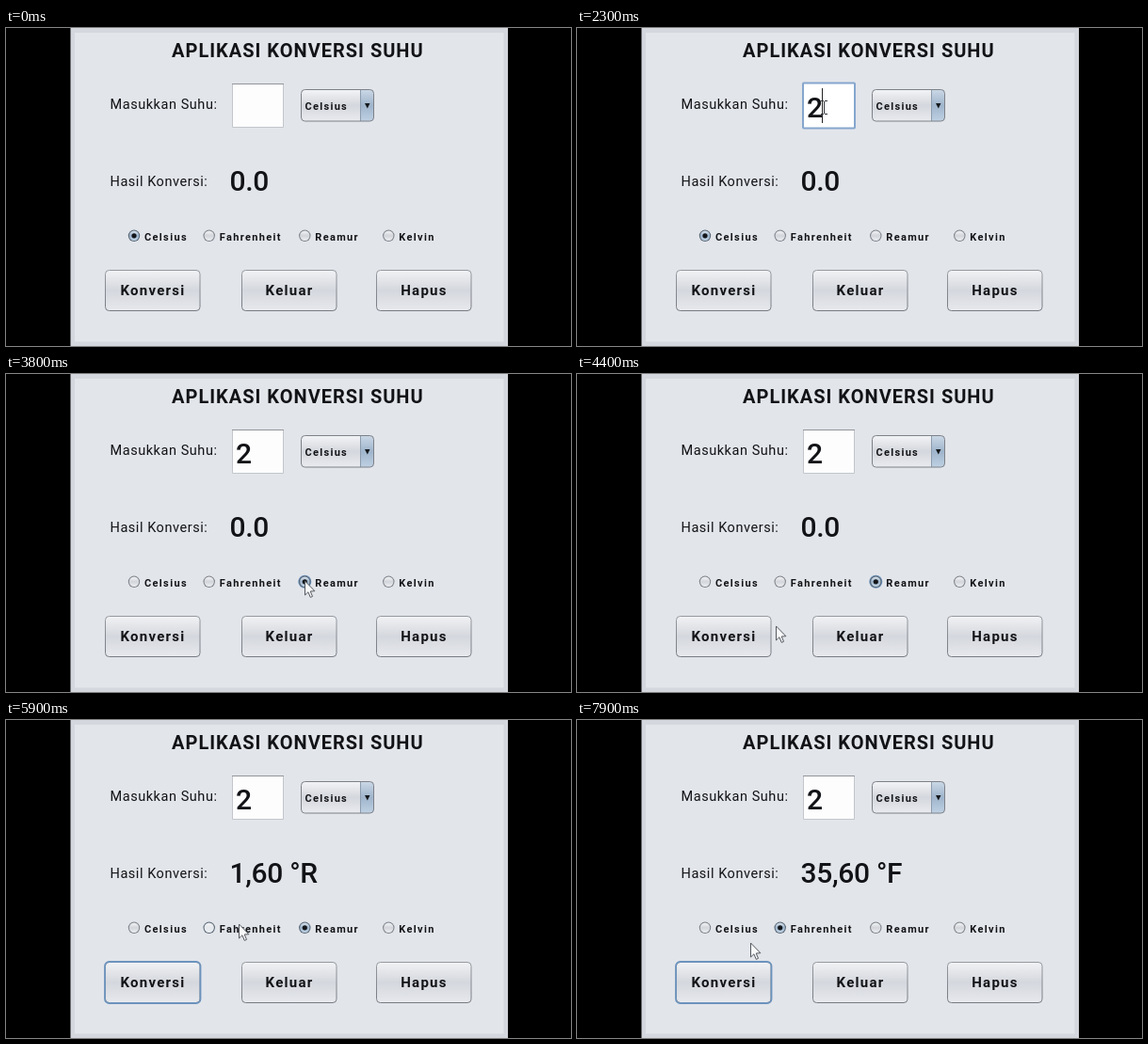
Animation of 600x338 px, one loop 8 s. Source, as an HTML page with a canvas:

```html
<!DOCTYPE html>
<html lang="id">
<head>
<meta charset="utf-8">
<title>Konversi Suhu</title>
<style>
html, body { margin: 0; width: 100%; height: 100%; overflow: hidden; background: #000; }
canvas { display: block; width: 600px; height: 338px; }
</style>
</head>
<body>
<canvas id="stage" width="600" height="338"></canvas>
<script>
const ctx = document.getElementById('stage').getContext('2d');
const LOOP = 8000, STEP = 100, MOVE = 400, BLINK = 500;
const INK = '#121316', EDGE = '#7d8188', RING = '#6c93bd';

// Clicks and key presses
const FOCUS = 900, TYPE = 2100, REAMUR = 3700, FIRST = 4700,
  FAHRENHEIT = 6500, SECOND = 7400, HOLD = 100;

const buttons = { Konversi: 105, Keluar: 250, Hapus: 393 };
const radios = { Celsius: 136, Fahrenheit: 215.7, Reamur: 317.3, Kelvin: 406.3 };

// Pointer stops: arrival time, x, y
const stops = [
  [700, 290, 2], [1000, 262, 84], [2900, 175, 291], [3100, 251, 197],
  [3400, 317, 220], [4200, 220, 284], [4400, 211, 268], [4600, 190, 279],
  [5900, 247, 217], [6100, 222, 219], [7100, 200, 279], [7900, 184, 237]
];

const inBox = ([px, py], x, y, w, h) => px >= x && px < x + w && py >= y && py < y + h;

// Rest at each stop, then glide to the next one within MOVE
function pointerAt(t) {
  const i = stops.findIndex(s => s[0] >= t);
  if (i < 0) return stops.at(-1).slice(1);
  const [arrive, x, y] = stops[i];
  if (i === 0) return t < arrive ? null : [x, y];
  const [left, fromX, fromY] = stops[i - 1];
  const begin = Math.max(left, arrive - MOVE);
  const k = Math.max(0, (t - begin) / (arrive - begin));
  const ease = k * k * (3 - 2 * k);
  return [fromX + (x - fromX) * ease, fromY + (y - fromY) * ease];
}

function label(text, x, y, size, weight = 400, spacing = 0, align = 'left') {
  ctx.font = `${weight} ${size}px Roboto, "Open Sans", sans-serif`;
  ctx.letterSpacing = spacing + 'px';
  ctx.textAlign = align;
  ctx.fillStyle = INK;
  ctx.fillText(text, x, y);
}

function rect(x, y, w, h, fill) {
  ctx.fillStyle = fill;
  ctx.fillRect(x, y, w, h);
}

function shade(y, h, ...colors) {
  const g = ctx.createLinearGradient(0, y, 0, y + h);
  colors.forEach((c, i) => g.addColorStop(i / (colors.length - 1), c));
  return g;
}

function box(x, y, w, h, radius, fill, stroke, line = 1) {
  ctx.beginPath();
  ctx.roundRect(x, y, w, h, radius);
  if (fill) { ctx.fillStyle = fill; ctx.fill(); }
  if (stroke) { ctx.strokeStyle = stroke; ctx.lineWidth = line; ctx.stroke(); }
}

function disc(x, y, r, fill) {
  ctx.beginPath();
  ctx.arc(x, y, r, 0, Math.PI * 2);
  ctx.fillStyle = fill;
  ctx.fill();
}

function polygon(points, fill, stroke) {
  ctx.beginPath();
  points.forEach(([x, y]) => ctx.lineTo(x, y));
  ctx.closePath();
  ctx.fillStyle = fill;
  ctx.fill();
  if (stroke) { ctx.strokeStyle = stroke; ctx.lineWidth = 1; ctx.stroke(); }
}

function drawPanel() {
  rect(0, 0, 600, 338, '#000');
  rect(68.5, 0, 464.5, 338, '#d4d7dd');
  rect(73, 5, 455.5, 328.5, '#e2e5ea');
  label('APLIKASI KONVERSI SUHU', 176, 30.5, 20, 700, 1);
  label('Masukkan Suhu:', 110.5, 86, 14.5, 400, 0.55);
  label('Hasil Konversi:', 110.5, 168, 14.5, 400, 0.55);
}

function drawField(text, focused, caret) {
  if (focused) {
    box(240, 58.5, 55, 48, 1, '#fff', '#86a6cd', 2);
  } else {
    box(240.5, 59.5, 54, 46, 0, '#fdfdfe', '#c2c5ca');
    rect(240, 59, 55, 1, '#92959a');
  }
  label(text, 244, 94.5, 30, 500);
  if (caret) rect(text ? 260 : 245, 64, 1, 37, '#222');
}

function drawCombo() {
  const y = 65.5, h = 33.5;
  box(313.5, y, 77, h, 4, shade(y, h, '#f3f4f6', '#d4d7dd', '#e9ebef'));
  box(376.5, y, 14, h, [0, 4, 4, 0], shade(y, h, '#cbd8e6', '#9fb5cc', '#bfd1e3'));
  rect(376, y, 1, h, '#8c9cae');
  box(313.5, y, 77, h, 4, null, EDGE);
  polygon([[381, 80], [386.5, 80], [383.8, 85.5]], '#15181c');
  label('Celsius', 317.5, 87.3, 11, 700, 1.3);
}

function drawRadio(text, x, { selected, focused, hover }) {
  const y = 220.8;
  if (focused) disc(x, y, 7, RING);
  disc(x, y, 6.2, selected || hover ? '#566472' : EDGE);
  disc(x, y, 5.2, selected
    ? shade(y - 5, 10, '#d6e1ec', '#9bb2ca', '#c3d6e8')
    : shade(y - 5, 10, '#f1f2f4', hover ? '#e6e9ed' : '#d2d5da', '#eceef1'));
  if (selected) disc(x, y, 2.6, '#14171b');
  label(text, x + 11, 225.5, 11, 700, 1.35);
}

function drawButton(text, x, { hover, pressed, focused }) {
  const y = 257.5, w = 100.5, h = 43;
  const colors = pressed ? ['#b9c2cf', '#9ca8b8', '#bcc7d4']
    : hover ? ['#f8f9fb', '#e6e9ee', '#f7f8fa']
    : ['#f1f2f4', '#d4d7dd', '#e7e9ed'];
  box(x + 0.5, y, w, h, 4, shade(y, h, ...colors), shade(y, h, '#95999f', '#777b82'));
  if (focused) box(x, y - 0.5, w + 1, h + 1, 4.5, null, RING, 1.8);
  label(text, x + 51, 284.3, 15, 700, 1.25, 'center');
}

function drawArrow(x, y) {
  const shape = [[0, 0], [0, 15], [3.4, 11.8], [5.8, 17.4], [8, 16.4],
    [5.7, 11], [10.4, 10.7]];
  polygon(shape.map(([a, b]) => [x + a + 0.5, y + b]), '#f8f9fa', '#55595f');
}

function drawBeam(x, y) {
  rect(x, y - 6, 1, 13, '#33363b');
  for (const dy of [-7, 7]) {
    rect(x - 3, y + dy, 3, 1, '#33363b');
    rect(x + 1, y + dy, 3, 1, '#33363b');
  }
}

function draw(t) {
  const pointer = pointerAt(t);
  const over = (...area) => pointer !== null && inBox(pointer, ...area);
  const since = start => t >= start && t < start + HOLD;
  const choice = t < REAMUR ? 'Celsius' : t < FAHRENHEIT ? 'Reamur' : 'Fahrenheit';
  const result = t < FIRST + HOLD ? '0.0' : t < SECOND + HOLD ? '1,60 °R' : '35,60 °F';
  const focus = t < FOCUS ? '' : t < REAMUR ? 'field' : t < FIRST ? 'Reamur'
    : t < FAHRENHEIT ? 'Konversi' : t < SECOND ? 'Fahrenheit' : 'Konversi';
  const typed = t >= TYPE;
  const caret = (t - (typed ? TYPE : FOCUS)) % (2 * BLINK) < BLINK;

  drawPanel();
  drawField(typed ? '2' : '', focus === 'field', focus === 'field' && caret);
  drawCombo();
  label(result, 237.5, 173, 30, 500, -0.3);

  for (const [text, x] of Object.entries(radios)) {
    drawRadio(text, x, {
      selected: text === choice,
      focused: text === focus,
      hover: over(x - 7, 211, 75, 20)
    });
  }
  for (const [text, x] of Object.entries(buttons)) {
    drawButton(text, x, {
      hover: over(x, 257, 101, 44),
      pressed: text === 'Konversi' && (since(FIRST) || since(SECOND)),
      focused: text === focus
    });
  }

  if (!pointer) return;
  const drawPointer = over(240, 58, 55, 48) ? drawBeam : drawArrow;
  drawPointer(...pointer.map(Math.round));
}

const start = performance.now();
function tick() {
  const t = (performance.now() - start) % LOOP;
  draw(Math.floor(t / STEP) * STEP);
  requestAnimationFrame(tick);
}
tick();
</script>
</body>
</html>
```
